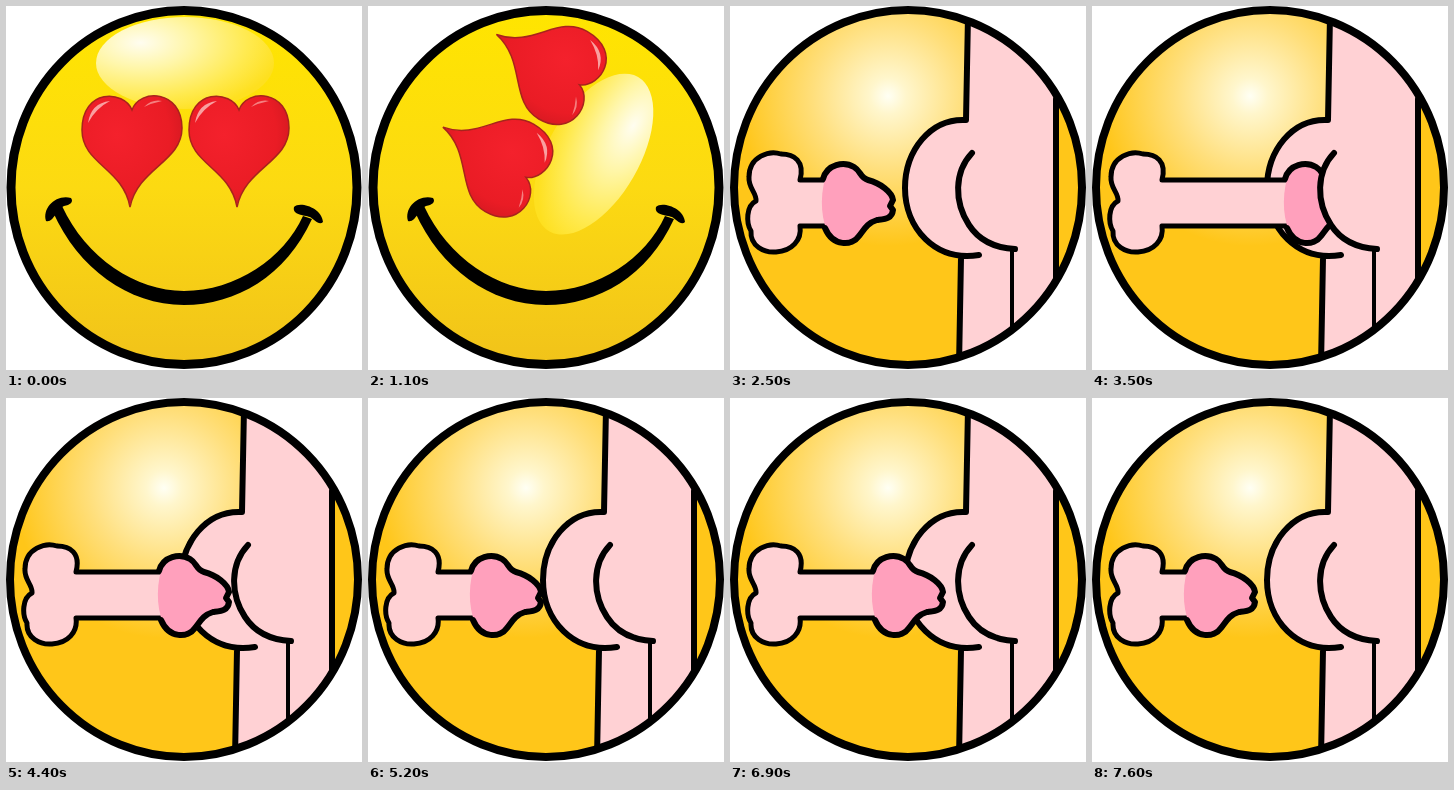
Write an HTML page that moves like this. It is 356 px wide and 364 px high and loops after 7.7 s.

```html
<!DOCTYPE html>
<html>
<head>
<meta charset="utf-8">
<style>
html, body { margin: 0; width: 100%; height: 100%; overflow: hidden; background: #fff; }
svg { display: block; width: 356px; height: 364px; }
.line { fill: none; stroke: #000; stroke-width: 6; stroke-linecap: round; stroke-linejoin: round; }
.skin { fill: #ffd1d4; }
</style>
</head>
<body>
<svg viewBox="0 0 356 364">
  <defs>
    <linearGradient id="yellow" x2="0" y2="1">
      <stop offset="0" stop-color="#ffe500"/>
      <stop offset=".5" stop-color="#fcda12"/>
      <stop offset="1" stop-color="#f1c31a"/>
    </linearGradient>
    <radialGradient id="shine" cx=".25" cy=".28" r=".8">
      <stop offset="0" stop-color="#fffdf0"/>
      <stop offset=".35" stop-color="#fff6a8"/>
      <stop offset=".75" stop-color="#ffea50"/>
      <stop offset="1" stop-color="#fee020"/>
    </radialGradient>
    <radialGradient id="red" cx=".35" cy=".35" r=".75">
      <stop offset="0" stop-color="#f4212c"/>
      <stop offset=".7" stop-color="#ea1c25"/>
      <stop offset="1" stop-color="#cf1820"/>
    </radialGradient>
    <radialGradient id="gold" gradientUnits="userSpaceOnUse" cx="158" cy="90" r="150">
      <stop offset="0" stop-color="#fffff4"/>
      <stop offset=".12" stop-color="#fff6cc"/>
      <stop offset=".5" stop-color="#ffdf7c"/>
      <stop offset="1" stop-color="#ffc619"/>
    </radialGradient>
    <clipPath id="round"><ellipse cx="178" cy="181.5" rx="175" ry="178"/></clipPath>
    <g id="heart">
      <path d="M126 104C118 84 76 82 76 124C76 158 117 162 124 201C132 162 176 156 176 122C176 84 134 82 126 104Z"
        fill="url(#red)" stroke="#a8231c" stroke-width="1.5"/>
      <path d="M82 117Q85 97 104 95Q90 102 82 117Z" fill="#f9a0a0"/>
      <path d="M138 101Q146 93 156 95Q146 97 138 101Z" fill="#f58080"/>
    </g>
  </defs>

  <g id="smile">
    <ellipse cx="178" cy="181.5" rx="173" ry="177" fill="url(#yellow)"/>
    <g id="eyes">
      <ellipse cx="179" cy="57" rx="89" ry="46" fill="url(#shine)"/>
      <use href="#heart"/>
      <use href="#heart" x="107"/>
    </g>
    <path d="M56 200C80 252 130 285 178 285C230 285 278 252 297 210L306 213C280 270 230 299 178 299C122 299 72 262 47 206Z"/>
    <path d="M40 215C36 202 50 188 65 192C68 196 64 199 58 200C50 203 48 217 40 215Z"/>
    <path d="M288 201C294 195 316 202 317 216C313 220 308 213 304 211C298 209 286 209 288 201Z"/>
    <ellipse cx="178" cy="181.5" rx="173" ry="177" fill="none" stroke="#000" stroke-width="9"/>
  </g>

  <g id="scene">
    <g clip-path="url(#round)">
      <rect width="356" height="364" fill="url(#gold)"/>
      <path class="skin" d="M238 0L236 114C200 112 175 145 175 182C175 222 205 256 249 249L231 252L229 364H326V0Z"/>
      <path class="line" d="M238 10L236 114C200 112 175 145 175 182C175 222 205 256 249 249M231 252L229 360"/>
      <path class="line" d="M326 93V278"/>
      <path class="line" stroke-linecap="butt" style="stroke-width:4" d="M282 243V330"/>
      <path id="shaft" class="skin"/>
      <path id="edges" class="line" style="stroke-width:5"/>
      <g id="head">
        <path fill="#ffa0bc" d="M98 164C102 158 116 157 124 161C131 165 130 172 138 174C150 177 162 186 163 194L159 200L163 204C162 213 155 213 147 214C137 217 134 224 129 230C122 240 103 241 97 225C90 208 90 184 98 164Z"/>
        <path class="line" d="M93 173C97 158 114 155 124 161C131 165 130 172 138 174C150 177 162 186 163 194L160 200L163 204C162 213 155 213 147 214C137 217 134 224 129 230C122 240 103 241 95 222"/>
      </g>
      <path class="skin" d="M242 147C224 166 224 196 239 219C250 236 266 242 285 243H322V147Z"/>
      <path class="line" d="M242 147C224 166 224 196 239 219C250 236 266 242 285 243"/>
    </g>
    <ellipse cx="178" cy="181.5" rx="174" ry="177.5" fill="none" stroke="#000" stroke-width="8"/>
  </g>
</svg>
<script>
const $ = id => document.getElementById(id);
const base = "C75 155 64 148 51 148C40 144 19 150 19 171C18 182 27 187 26 195C16 200 16 217 21 225C20 240 34 247 46 246C62 245 72 234 70 220";

function draw(ms) {
  const t = ms % 7700, step = Math.floor(t / 100);
  const smiling = t < 2500;
  $("smile").style.display = smiling ? "" : "none";
  $("scene").style.display = smiling ? "none" : "";

  // the eyes make one full turn in six steps
  const turn = step >= 10 && step < 15 ? (step - 9) * 60 : 0;
  $("eyes").setAttribute("transform", `rotate(${turn} 176 116)`);

  // ten steps out, two steps back
  const k = Math.max(0, step - 25) % 13;
  const d = k <= 10 ? k * 10 : k === 11 ? 50 : 0;
  const x = 95 + d;
  $("head").setAttribute("transform", `translate(${d})`);
  $("shaft").setAttribute("d", `M${x} 174H70${base}H${x}Z`);
  $("edges").setAttribute("d", `M${x} 174H70${base}H${x}`);
}

const start = performance.now();
function loop(now) {
  draw(Math.max(0, now - start));
  requestAnimationFrame(loop);
}
draw(0);
requestAnimationFrame(loop);
</script>
</body>
</html>
```
